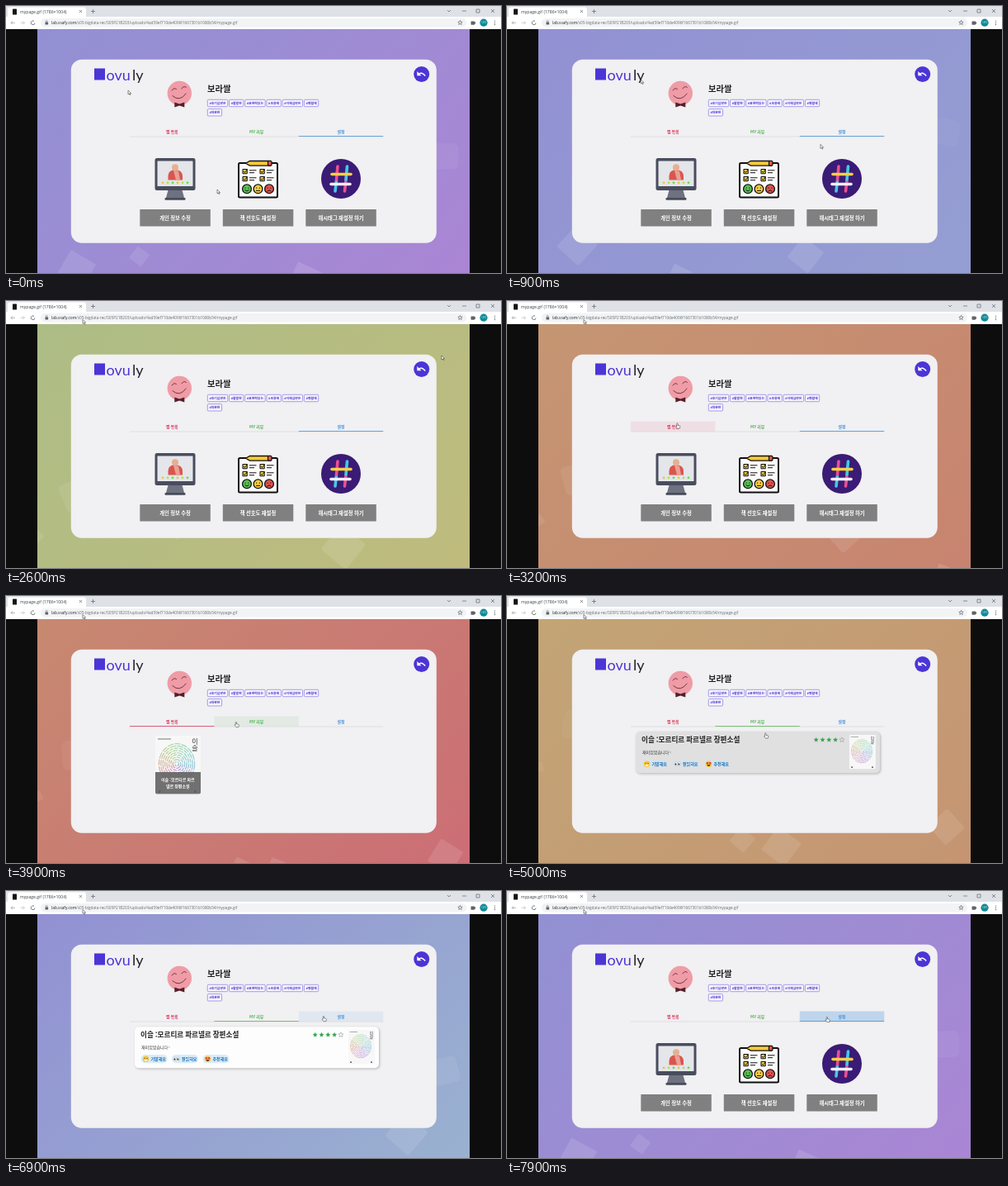
Animation, 600 px wide and 323 px high, one loop 8 s. Source, as an HTML page with a canvas:

```html
<!DOCTYPE html>
<html lang="ko">
<head>
<meta charset="utf-8">
<title>mypage</title>
<style>
html, body { margin: 0; width: 100%; height: 100%; overflow: hidden; background: #0d0d0d; }
canvas { display: block; width: 600px; height: 323px; }
</style>
</head>
<body>
<canvas id="view"></canvas>
<script>
const W = 600, H = 323, LOOP = 8000, STEP = 100;
const KR = '"Noto Sans CJK KR", "Noto Sans CJK JP", "Noto Sans CJK", "Noto Sans KR", sans-serif';
const UI = '"Open Sans", "Noto Sans", sans-serif';
const LOGO = 'Lato, sans-serif';
const PURPLE = '#4b35d6', INK = '#111', GREY = '#5f6368';
const view = document.getElementById('view');
const scale = window.devicePixelRatio || 1;
view.width = W * scale;
view.height = H * scale;
const c = view.getContext('2d');

const STAGE = { x: 38, y: 28, w: 524, h: 295 };
const TAB = { x: 150, y: 145.5, w: 102.4, h: 12.3 };
const TABS = [['찜 목록', '#d8385c'], ['MY 리뷰', '#55b455'], ['설정', '#3b90dc']];
const TAGS = ['호기심많은', '활발한', '표현력있는', '조용해', '이해심많은', '쾌활해', '차분한'];

// Pointer stops: time, x, y
const OUTER = [[0, 148, 102], [1600, 172, 80], [1900, 93, 22.5]];
const INNER = [[0, 256, 222], [1600, 465, 130], [2600, 528, 66], [3250, 201, 152],
  [3900, 279, 155], [4400, 298, 153], [5700, 333, 188], [6900, 385, 154], [8000, 388, 155]];
// Clicks: time, opened tab
const CLICKS = [[0, 2], [3300, 0], [4400, 1], [7400, 2]];

const clamp = v => Math.max(0, Math.min(1, v));
const mix = (a, b, k) => a + (b - a) * k;
const smooth = k => k * k * (3 - 2 * k);
const cosDeg = d => Math.cos(d * Math.PI / 180);

function random(seed) {
  return () => (seed = seed * 16807 % 2147483647) / 2147483647;
}
function lastIndex(keys, t) {
  return keys.findLastIndex(k => k[0] <= t);
}
function follow(keys, t) {
  const i = lastIndex(keys, t), a = keys[i], b = keys[i + 1] || a;
  const k = smooth(clamp((t - a[0]) / (b[0] - a[0] || 1)));
  return [mix(a[1], b[1], k), mix(a[2], b[2], k)];
}

function paint(fill, stroke, line = 1) {
  if (fill) { c.fillStyle = fill; c.fill(); }
  if (stroke) { c.strokeStyle = stroke; c.lineWidth = line; c.stroke(); }
}
function box(x, y, w, h, r, ...style) {
  c.beginPath();
  c.roundRect(x, y, w, h, r);
  paint(...style);
}
function oval(x, y, rx, ry, ...style) {
  c.beginPath();
  c.ellipse(x, y, rx, ry, 0, 0, 7);
  paint(...style);
}
function disc(x, y, r, ...style) {
  oval(x, y, r, r, ...style);
}
function shape(d, fill, stroke, line = 1) {
  const p = new Path2D(d);
  if (fill) { c.fillStyle = fill; c.fill(p); }
  if (stroke) { c.strokeStyle = stroke; c.lineWidth = line; c.stroke(p); }
}
function star(x, y, r, ...style) {
  c.beginPath();
  for (let i = 0; i < 10; i++) {
    const a = i * Math.PI / 5 - Math.PI / 2, q = i % 2 ? r * 0.45 : r;
    c.lineTo(x + q * Math.cos(a), y + q * Math.sin(a));
  }
  c.closePath();
  paint(...style);
}
function text(s, x, y, size, color, weight = 400, align = 'left', family = KR) {
  c.font = `${weight} ${size}px ${family}`;
  c.textAlign = align;
  c.fillStyle = color;
  c.fillText(s, x, y);
  return c.measureText(s).width;
}
// Runs a drawing with its own origin
function at(x, y, draw, zoom = 1, angle = 0) {
  c.save();
  c.translate(x, y);
  c.rotate(angle);
  c.scale(zoom, zoom);
  draw();
  c.restore();
}

function browser() {
  box(0, 0, W, 13, 0, '#dee1e6');
  box(2, 1.5, 95, 14, [3, 3, 0, 0], '#fff');
  box(0, 13, W, STAGE.y - 13, 0, '#fff');
  box(8, 3.5, 5, 7, 0.5, '#151515');
  text('mypage.gif (1786×1004)', 17, 8.8, 5.1, '#3c4043', 400, 'left', UI);
  shape('M89 5l3 3m0-3l-3 3M103 6.5h5m-2.5-2.5v5', null, GREY, 0.7);
  shape('M535 5l2 2l2-2m14 1h5m12-2h4v4h-4zm18 0l4 4m0-4l-4 4', null, GREY, 0.7);

  box(42, 15, 516, 10.5, 5, '#f1f3f4');
  const back = 'M2.5 0h-5m2-2l-2 2l2 2';
  at(8.5, 20.3, () => shape(back, null, '#a0a3a7', 0.8));
  at(20, 20.3, () => shape(back, null, '#c0c3c6', 0.8), 1, Math.PI);
  shape('M35 20.5a2.4 2.4 0 1 1-1-2.2', null, GREY, 0.8);
  box(47.5, 19.6, 3.6, 3, 0.4, GREY);
  shape('M48.2 19.6v-1a1 1 0 0 1 2 0v1', null, GREY, 0.6);
  const w = text('lab.ssafy.com', 55, 22.2, 4.8, '#202124', 400, 'left', UI);
  text('/s05-bigdata-rec/S05P21B203/uploads/4ad59ef710de4096f1667301b1080b54/mypage.gif',
    55 + w, 22.2, 4.7, '#6a6e73', 400, 'left', UI);
  star(550.5, 20.2, 2.8, null, GREY, 0.7);
  box(563.5, 18.5, 4.5, 4.2, 0.6, GREY);
  disc(568, 20.5, 1.2, GREY);
  disc(579, 20.2, 4.6, '#0e8a96');
  text('나리', 579, 21.3, 3, '#fff', 400, 'center');
  for (let i = -1; i < 2; i++) disc(592.5, 20.3 + i * 2.2, 0.65, GREY);
}

function tint(hue) {
  return `hsl(${hue} ${38 - 14 * cosDeg(hue - 130)}% ${66 + 5 * cosDeg(hue - 200)}%)`;
}
// The hues swing from violet to orange and back
function sky(t) {
  const swing = (1 + cosDeg(360 * t / LOOP)) / 2;
  const g = c.createLinearGradient(95, -30, 505, 380);
  g.addColorStop(0, tint(17 + 224 * smooth(clamp(1.25 * swing))));
  g.addColorStop(1, tint(-5 + 273 * swing ** 1.15));
  return g;
}

function backdrop(t) {
  c.save();
  c.beginPath();
  c.rect(STAGE.x, STAGE.y, STAGE.w, STAGE.h);
  c.clip();
  c.fillStyle = sky(t);
  c.fillRect(STAGE.x, STAGE.y, STAGE.w, STAGE.h);
  const rnd = random(83);
  for (let i = 0; i < 10; i++) {
    const x = STAGE.x + STAGE.w * (i * 0.618 % 1);
    const size = 12 + 28 * rnd(), age = (t / LOOP + rnd()) % 1;
    at(x, H + 25 - 260 * age, () =>
      box(-size / 2, -size / 2, size, size, size * age / 3, `rgba(255,255,255,${0.13 * (1 - age)})`),
      1, 0.3 + 2 * age);
  }
  c.restore();
}

function face() {
  disc(0, 0, 14.7, '#ef9ca7');
  shape('M-9-4q3-4 6-1M3-5q3-4 6-1M-9 2q8 9 17-1', null, '#5b2530', 0.8);
}

function tags() {
  let x = 244.3, y = 113.3;
  for (const tag of TAGS) {
    c.font = `700 3.9px ${KR}`;
    const w = c.measureText('#' + tag).width + 4.2;
    if (x + w > 384) { x = 244.3; y += 11.3; }
    box(x, y, w, 8.4, 1, '#f7f6fc', '#8578e2', 0.7);
    text('#' + tag, x + w / 2, y + 5.7, 3.9, PURPLE, 700, 'center');
    x += w + 1.9;
  }
}

function profile() {
  box(78.8, 64.8, 443, 222, 13, '#f1f0f2');
  box(107, 75.5, 13, 14, 0, PURPLE);
  text('ovu', 121.5, 89.5, 18, PURPLE, 400, 'left', LOGO);
  text('ly', 153, 89.5, 18, '#25222c', 400, 'left', LOGO);
  at(210.3, 105.5, face, 1, -0.1);
  at(210.3, 119.5, () => shape('M-6-3l6 2l6-2v6l-6-2l-6 2z', '#54202a'));
  text('보라쌀', 244, 103.5, 10.3, '#222', 700);
  tags();
  disc(503.7, 82.5, 9.5, PURPLE);
  at(503.7, 82.5, () => {
    shape('M-4 0q4-3.5 8.5 2', null, '#fff', 1.5);
    shape('M-5.4-3.5v5.2h5.2z', '#fff');
  });
}

function tabs(tab, prev, since, hover) {
  box(TAB.x, 157.7, TAB.w * 3, 0.6, 0, '#c9c9cc');
  TABS.forEach(([label, color], i) => {
    const x = TAB.x + i * TAB.w;
    if (hover === i) {
      c.globalAlpha = i === tab ? 0.28 : 0.09;
      box(x, TAB.y, TAB.w, TAB.h, 0, color);
      c.globalAlpha = 1;
    }
    text(label, x + TAB.w / 2, 153.5, 4.9, color, 700, 'center');
  });
  const k = smooth(clamp(since / 200));
  box(TAB.x + mix(prev, tab, k) * TAB.w, 157.2, TAB.w, 0.9, 0, TABS[tab][1]);
}

function monitor() {
  shape('M-8 12h16l3 11h-22z', '#6d7180');
  box(-12.5, 23, 25, 2.8, 1, '#474b59');
  box(-24.5, -25, 49, 39, 2.5, '#494d5d');
  box(-21.5, -21.5, 43, 30.5, 0.5, '#e4e6ea');
  shape('M-8.500 1.500v-5q0-7 8.500-7.500q9 .5 9 8v4.500z', '#d9564f');
  shape('M-2-10l3 11.500h5l-2-11z', '#e9a193');
  disc(0, -13.8, 4, '#e6b091');
  for (let i = 0; i < 6; i++) star(i * 6 - 15, 4.7, 2.2, `hsl(${50 + i % 3 * 30} 75% 58%)`);
}

function survey() {
  box(-23.5, -19, 47, 41.5, 1.5, '#fbfbfb', INK, 2);
  shape('M-15-18.700l5-2.800h25v5.600h-25z', '#f5c93a', INK, 1.3);
  box(12, -21.5, 4.5, 5.6, 1, '#e4574c', INK, 1.2);
  for (const x of [-18.5, 2.5]) for (const y of [-11.5, -2.5]) at(x, y, () => {
    box(0, 0, 5.2, 5.2, 0.4, '#f7d64a', INK, 1.1);
    shape('M1 2.500l1.500 1.500l3-4M8 1.300h8.500M8 4.200h6', null, INK);
  });
  ['#58c452', '#f8cc3d', '#e5534b'].forEach((color, i) => at((i - 1) * 13.5, 12.3, () => {
    disc(0, 0, 5.4, color, INK, 1.3);
    for (const x of [-1.9, 1.9]) disc(x, -1.2, 0.7, INK);
    shape(`M-2.500 ${1.2 + i * 0.9}q2.500 ${3 - 3 * i} 5 0`, null, INK);
  }));
}

function hash() {
  const pink = '#ec4f8f', cyan = '#45c8e8';
  disc(0, 0, 24, '#3a1b76');
  c.lineCap = 'round';
  [[-5.5, pink, cyan], [6, cyan, pink]].forEach(([x, top, low]) => {
    shape(`M${x} 2l-1.500 13`, null, low, 3.6);
    shape(`M${x + 1.5}-15l-1.500 16`, null, top, 3.6);
  });
  shape('M-11-5.500h23', null, '#f7cf46', 3.6);
  shape('M-12 6.500h23', null, '#f3eef8', 3.6);
}

function settings() {
  const labels = ['개인 정보 수정', '책 선호도 재설정', '해시태그 재설정 하기'];
  [monitor, survey, hash].forEach((icon, i) => {
    const x = 205 + i * 100.5;
    at(x, 209, icon);
    box(x - 42.7, 246, 85.5, 20.5, 0.5, '#808080');
    text(labels[i], x, 258.5, 6.3, '#fff', 700, 'center');
  });
}

function cover() {
  box(0, 0, 55, 71, 0, '#f7f7f8');
  const g = c.createConicGradient(0, 26, 34);
  for (let i = 0; i <= 6; i++) g.addColorStop(i / 6, `hsl(${(190 + i % 6 * 65) % 360} 45% 72%)`);
  const rnd = random(7);
  for (let r = 1; r < 10; r++) {
    c.setLineDash([3 + 6 * rnd(), 1.2]);
    oval(26, 34, r * 2.4, r * 2.7, null, g, 1.2);
  }
  c.setLineDash([]);
  text('이', 48, 10, 8, '#333', 400, 'center');
  text('슬', 48, 18, 8, '#333', 400, 'center');
  box(3, 3.5, 16, 1, 0, '#777');
  for (const x of [4, 47]) box(x, 66, 2.5, 3, 0, '#444');
}

function wishes() {
  at(181, 169, cover);
  box(181, 213, 55, 26.5, [0, 0, 2, 2], 'rgba(98,98,98,0.9)');
  text('이슬 :모르티르 파르', 208.3, 224, 5, '#fff', 700, 'center');
  text('넬르 장편소설', 208.3, 231.7, 5, '#fff', 700, 'center');
}

function laugh() {
  disc(0, 0, 3.7, '#f9c638');
  for (const x of [-1.5, 1.5]) disc(x, -0.9, 0.6, '#5a3a12');
  shape('M-2 .8h4q-.4 2-2 2q-1.600 0-2-2z', '#fff');
}
function eyes() {
  for (const x of [-2, 2]) {
    oval(x, 0, 1.7, 2.5, '#fff', '#999', 0.4);
    disc(x - 0.5, 0.3, 1, '#222');
  }
}
function love() {
  disc(0, 0, 3.7, '#f9c638');
  for (const x of [-1.6, 1.6]) disc(x, -0.9, 1.3, '#e23b48');
  shape('M-2 .8h4q-.4 2-2 2q-1.600 0-2-2z', '#6b3a14');
}

function reviews(hover) {
  c.save();
  c.shadowColor = 'rgba(0,0,0,0.25)';
  c.shadowBlur = 3 * scale;
  c.shadowOffsetX = c.shadowOffsetY = scale;
  box(156, 164.3, 296, 50, 5, hover ? '#e0e0e0' : '#fdfdfd');
  c.restore();
  text('이슬 :모르티르 파르넬르 장편소설', 163, 177, 8.6, '#222', 700);
  text('재미있었습니다~', 164, 190.5, 5, '#333');
  const words = ['기발해요', '잘읽혀요', '추천해요'];
  [laugh, eyes, love].forEach((emoji, i) => {
    const x = 163.5 + i * 37.5;
    box(x, 198, 32, 10.3, 5, hover ? '#d8e2ea' : '#d9ecfa');
    at(x + 6, 203.2, emoji);
    text(words[i], x + 12, 205.1, 5, '#1f6fb0', 700);
  });
  for (let i = 0; i < 5; i++) star(374.7 + i * 7.8, 174, 3.2, i < 4 && '#35a853', i === 4 && '#999', 0.6);
  at(415, 168, cover, 0.58);
}

function arrow() {
  shape('M0 0v5.400l1.300-1.100l1 2l.9-.4l-.9-1.900h1.700z', '#fff', '#333', 0.6);
}
function hand() {
  shape('M-.8-2.500q.8-1 1.400 0v2.300l2.500.6q.8.3.6 1.400l-.6 2.200h-3.200l-2-2.500q0-1 1.300-.3z', '#fff', '#333', 0.6);
}

function draw(t) {
  c.setTransform(scale, 0, 0, scale, 0, 0);
  c.fillStyle = '#0d0d0d';
  c.fillRect(0, 0, W, H);
  browser();
  backdrop(t);
  profile();

  const n = lastIndex(CLICKS, t), [start, tab] = CLICKS[n];
  const prev = n ? CLICKS[n - 1][1] : tab;
  const [x, y] = follow(INNER, t);
  const over = Math.floor((x - TAB.x) / TAB.w);
  const onTab = y > TAB.y && y < TAB.y + TAB.h && over in TABS;
  const onCard = tab === 1 && y > 164 && y < 214;
  tabs(tab, prev, t - start, onTab ? over : -1);
  [wishes, reviews, settings][tab](onCard);

  at(x, y, onTab || onCard ? hand : arrow, 0.9);
  at(...follow(OUTER, t), arrow, 0.9);
}

function tick(now) {
  draw(Math.floor(now % LOOP / STEP) * STEP);
  requestAnimationFrame(tick);
}
draw(0);
requestAnimationFrame(tick);
</script>
</body>
</html>
```
